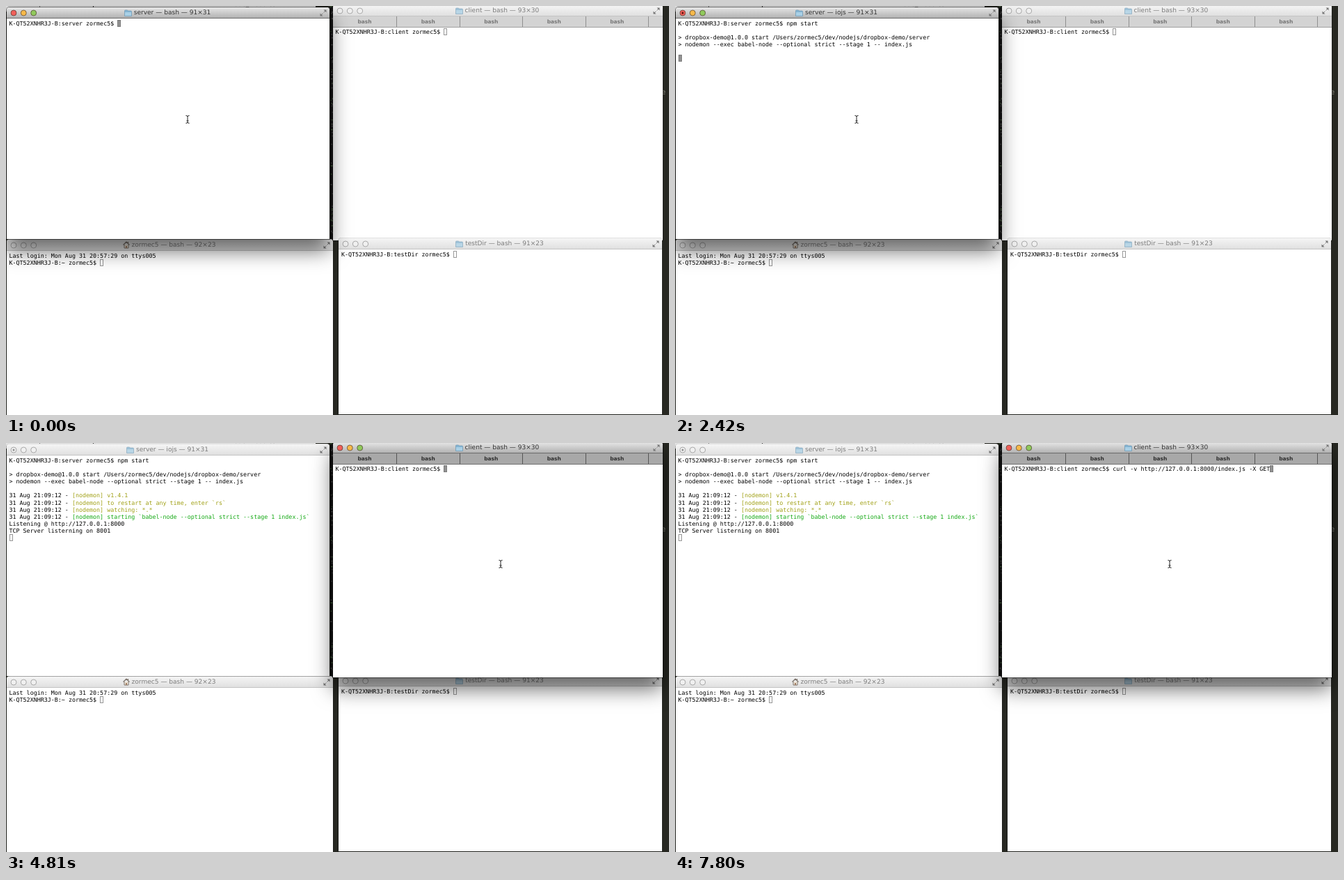
Animation, 953 px wide and 588 px high, one loop 8 s. Source, as an HTML page:

```html
<!DOCTYPE html>
<html lang="en">
<head>
<meta charset="utf-8">
<title>Terminal session</title>
<style>
html, body { margin: 0; width: 100%; height: 100%; overflow: hidden; }
#stage {
  position: relative; width: 953px; height: 588px; overflow: hidden;
  background: #272822; text-rendering: geometricPrecision;
  font-family: 'DejaVu Sans', sans-serif;
}
#stage > * { position: absolute; }
#behind {
  left: 0; top: 0; width: 445px; height: 8px; background: #e2e2e2;
  font-size: 9px; line-height: 10px; overflow: hidden;
}
#behind span { position: absolute; top: -7px; white-space: pre; }
#behind i { position: absolute; left: 48px; width: 1px; height: 8px; background: #777; }
#edge { left: 942px; top: 119px; font-size: 10px; line-height: 12px; color: #85857c; }
#specks { left: 466px; top: 0; background: #111; }

.win {
  background: #fff; border-radius: 4px 4px 0 0;
  box-shadow: 0 -1px #e0e0e0, 0 0 0 1px rgba(0, 0, 0, .28);
}
.front { box-shadow: 0 0 0 1px rgba(0, 0, 0, .5), 0 16px 30px rgba(0, 0, 0, .6); }
.bar {
  position: relative; height: 16px; box-sizing: border-box; padding-right: 2px;
  display: flex; justify-content: center; align-items: center; gap: 3px;
  border-radius: 4px 4px 0 0; border-bottom: 1px solid #c4c4c4;
  background: linear-gradient(#f5f5f5, #e0e0e0);
  font-size: 9.05px; line-height: 15px; color: #7d7d7d; white-space: pre;
}
.bar span { position: relative; top: 1px; }
.front .bar { background: linear-gradient(#e6e6e6, #b2b2b2); border-color: #6c6c6c; color: #333; }
.bar .lights { position: absolute; left: 0; top: 3px; }
.bar .zoom { position: absolute; right: 4px; top: 3px; }
.lights circle { fill: #f0f0f0; stroke: #a9a9a9; }
.lights .dot { fill: none; stroke: none; }
.busy .lights .dot { fill: #8d8d8d; }
.front .lights circle { stroke: rgba(60, 40, 30, .6); }
.front .lights .r { fill: #f0605a; }
.front .lights .y { fill: #f6b94a; }
.front .lights .g { fill: #90c95c; }
.front .lights .dot { stroke: none; }
.front.busy .lights .dot { fill: #5c100c; }
.win:not(.front) .icon { opacity: .75; }

.tabs {
  display: flex; height: 16px; margin-bottom: -1px; box-sizing: border-box;
  background: #d3d3d3; border-bottom: 1px solid #a0a0a0;
  font: bold 7.5px/15px 'DejaVu Sans', sans-serif; color: #777; text-align: center;
}
.tabs b { width: 90.5px; box-sizing: border-box; border-right: 1px solid #8f8f8f; }
.tabs b:first-child { width: 92px; }
.front .tabs { background: #a8a8a8; color: #2e2e2e; border-color: #707070; }
.front .tabs b { border-color: #555; }

pre {
  position: relative; margin: 2px 0 0 3.5px; color: #000;
  font: 8.35px/10.1px 'DejaVu Sans Mono', monospace;
}
pre i { box-shadow: inset 0 0 0 1px #979797; }
.front pre i { background: #929292; box-shadow: inset 0 0 0 1px #7c7c7c; }
.warn { color: #a0a016; }
.good { color: #12a812; }
#pointer { overflow: visible; z-index: 9; width: 1px; height: 1px; }
</style>
</head>
<body>
<div id="stage">
  <div id="behind"><i></i><span style="left:100px">1. http</span><span style="left:314px">&#9492; node_modules</span></div>
  <div id="edge">e</div>
  <svg id="specks" width="4" height="336"></svg>
</div>
<script>
const LOOP = 8000, COLS = 93;
const HOST = 'K-QT52XNHR3J-B', USER = 'zormec5';
const stage = document.getElementById('stage');
const prompt = dir => `${HOST}:${dir} ${USER}$ `;
const CURSOR = '<i> </i>';

const folder = `<svg class="icon" width="11" height="10">
  <path d="M.5 2Q.5 1 1.5 1H4.5L5.5 2H9.5Q10.5 2 10.5 3V9.5H.5Z" fill="#84b4d2" stroke="#6f9ab5" stroke-width=".7"/>
  <path d="M1 4H10V9H1Z" fill="#a9d0e6"/></svg>`;
const house = `<svg class="icon" width="10" height="11">
  <path d="M2 5V10H8V5" fill="#eee2cf" stroke="#5b5048"/>
  <path d="M.5 5.5L5 1.2L9.5 5.5M7.5 1V3" fill="none" stroke="#55493f" stroke-width="1.2"/>
  <path d="M4 7H6V10H4Z" fill="#8a5a38"/></svg>`;
const lights = `<svg class="lights" width="48" height="10">
  <circle class="r" cx="10" cy="5" r="4"/><circle class="dot" cx="10" cy="5" r="1.5"/>
  <circle class="y" cx="24.3" cy="5" r="4"/><circle class="g" cx="38.7" cy="5" r="4"/></svg>`;
const zoom = `<svg class="zoom" width="10" height="10" fill="#777" stroke="#777">
  <path d="M5.5 .5H9.5V4.5ZM.5 5.5V9.5H4.5Z" stroke="none"/><path d="M5.7 4.3L8 2M2 8L4.3 5.7"/></svg>`;

function addWindow(x, y, w, h, z, icon, title, text, tabs = '') {
  const win = document.createElement('div');
  win.className = 'win';
  win.style.cssText = `left:${x}px;top:${y}px;width:${w}px;height:${h}px;z-index:${z}`;
  win.innerHTML = `<div class="bar">${lights}${icon}<span>${title}</span>${zoom}</div>${tabs}<pre>${text}</pre>`;
  stage.append(win);
  return { win, title: win.querySelector('span'), text: win.querySelector('pre') };
}

const tabs = `<div class="tabs">${'<b>bash</b>'.repeat(5)}</div>`;
addWindow(1, 336, 469, 254, 1, house, `${USER} — bash — 92×23`,
  `Last login: Mon Aug 31 20:57:29 on ttys005\n${prompt('~')}${CURSOR}`);
const client = addWindow(470, -1, 474, 338, 2, folder, 'client — bash — 93×30', '', tabs);
addWindow(478, 334, 465, 253, 3, folder, 'testDir — bash — 91×23', prompt('testDir') + CURSOR)
  .text.style.marginLeft = '4px';
const server = addWindow(1, 2, 464, 333, 4, folder, '', '');

const pointer = document.createElementNS('http://www.w3.org/2000/svg', 'svg');
pointer.id = 'pointer';
stage.append(pointer);
const shapes = {
  beam: '<path d="M-2.5 -5.5Q0 -5.5 0 -4Q0 -5.5 2.5 -5.5M0 -4.5V4.5M-2.5 5.5Q0 5.5 0 4Q0 5.5 2.5 5.5M-1.5 2H1.5" fill="none" stroke="#222"/>',
  arrow: '<path d="M.5 .5V11L3 8.7L4.8 12.8L6.6 12L4.9 8H8.2Z" fill="#000" stroke="#fff" stroke-width=".7"/>'
};

// Slivers of a terminal between the windows
let seed = 7;
const random = () => (seed = seed * 16807 % 2147483647) / 2147483647;
document.getElementById('specks').innerHTML = Array.from({ length: 60 }, () =>
  `<rect x="${random() * 3}" y="${Math.floor(random() * 334)}" width="${1 + random() * 2}" height="1.5" fill="${random() < .3 ? '#3f5a36' : '#4a4a4a'}"/>`
).join('');

const log = (kind, text) => `31 Aug 21:09:12 - <span class="${kind}">[nodemon] ${text}</span>\n`;
const script = `\n&gt; dropbox-demo@1.0.0 start /Users/${USER}/dev/nodejs/dropbox-demo/server
&gt; nodemon --exec babel-node --optional strict --stage 1 -- index.js\n\n`;
const watching = script + log('warn', 'v1.4.1') + log('warn', 'to restart at any time, enter `rs`') +
  log('warn', 'watching: *.*') + log('good', 'starting `babel-node --optional strict --stage 1 index.js`');
const ready = watching + 'Listening @ http://127.0.0.1:8000\nTCP Server listerning on 8001\n';
const url = 'curl -v http://127.0.0.1:8000/';

// Each step changes part of the state at its time
const steps = [
  [0, { typed: 0, job: 'bash', out: '', curl: '', front: server, at: ['beam', 261, 163] }],
  [500, { typed: 1 }],
  [650, { typed: 2 }],
  [790, { typed: 3 }],
  [940, { typed: 4 }],
  [1080, { typed: 5 }],
  [1230, { typed: 6 }],
  [1380, { typed: 8 }],
  [1530, { typed: 9 }],
  [1980, { job: 'iojs' }],
  [2420, { out: script }],
  [2570, { out: watching }],
  [3620, { out: ready }],
  [4220, { at: ['arrow', 537, 151] }],
  [4370, { at: ['arrow', 736, 233] }],
  [4510, { at: ['arrow', 729, 207] }],
  [4660, { at: ['arrow', 709.5, 173] }],
  [4810, { front: client, at: ['beam', 710.5, 174] }],
  [5710, { curl: 'curl ' }],
  [6160, { curl: url + 'index.js -X POST --data "hello world"' }],
  [6460, { curl: url + 'testDir -X PUT' }],
  [7800, { curl: url + 'index.js -X GET' }]
];

function wrap(line) {
  return line.length > COLS ? line.slice(0, COLS) + '\n' + line.slice(COLS) : line;
}

function draw(index) {
  const s = Object.assign({}, ...steps.slice(0, index + 1).map(step => step[1]));
  const running = s.job !== 'bash';
  server.title.textContent = `server — ${s.job} — 91×31`;
  server.text.innerHTML = prompt('server') + 'npm start'.slice(0, s.typed) + (running ? '\n' : '') + s.out + CURSOR;
  client.text.innerHTML = wrap(prompt('client') + s.curl) + CURSOR;
  server.win.classList.toggle('busy', running);
  for (const w of [server, client]) w.win.classList.toggle('front', w === s.front);
  client.win.style.zIndex = s.front === client ? 5 : 2;
  const [shape, x, y] = s.at;
  pointer.innerHTML = shapes[shape];
  pointer.style.left = x + 'px';
  pointer.style.top = y + 'px';
}

const start = performance.now();
let shown = -1;
function tick() {
  const t = (performance.now() - start) % LOOP;
  const index = steps.filter(step => step[0] <= t).length - 1;
  if (index !== shown) draw(shown = index);
  requestAnimationFrame(tick);
}
tick();
</script>
</body>
</html>
```
